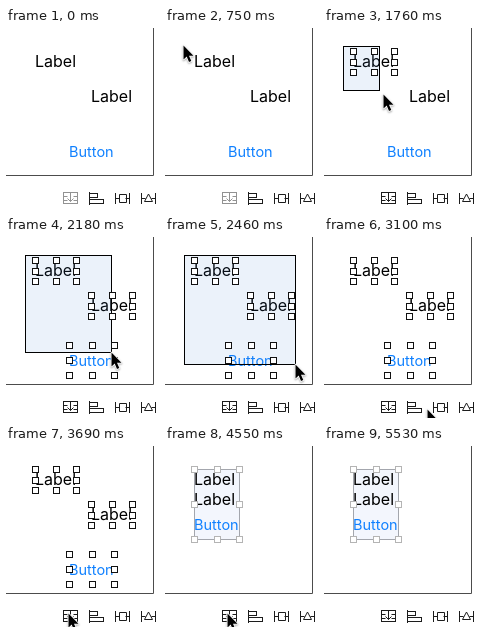
An HTML page with a canvas that plays this animation: 153x181 px, repeating every 6370 ms.

```html
<!DOCTYPE html>
<html lang="en">
<head>
<meta charset="utf-8">
<title>Stack view</title>
<style>
html, body { margin: 0; width: 100%; height: 100%; overflow: hidden; background: #fff; }
canvas { display: block; }
</style>
</head>
<body>
<canvas id="stage" width="153" height="181"></canvas>
<script>
const ctx = document.getElementById('stage').getContext('2d');
const LOOP = 6370, STEP = 40, LEAD = 50;
const ENTER = 300, DRAG = 1680, PAUSE = 1880, DROP = 2640, STACK = 4550, LEAVE = 5530;
const LEFT = 29, TOP = 23, ROW = 170.5, INK = '#1c1c1c';

const point = (x, y) => ({ x, y });
const entry = point(-13, 42), origin = point(18, 17);

// the pointer travels to each stop between two times and rests there
const stops = [
  { from: ENTER, until: 750, to: origin },
  { from: DRAG, until: PAUSE, to: point(97, 111) },
  { from: 2120, until: 2460, to: point(130, 127) },
  { from: 2810, until: 3100, to: point(103, 172) },
  { from: 3160, until: 3440, to: point(66, 170) },
  { from: 3490, until: 3690, to: point(62, 167) },
  { from: 5090, until: LEAVE, to: point(20, 185) }
];

const label = (x, y) => ({ text: 'Label', x, y, w: 41, h: 21, size: 16, color: '#000', base: 16 });
const button = (x, y) => ({ text: 'Button', x, y, w: 45, h: 30, size: 14.5, color: '#0f80ff', base: 21 });
const views = [label(LEFT, TOP), label(85, 58), button(63, 108)];

const mix = (a, b, p) => Math.round(a + (b - a) * p);

function pointerAt(t) {
  let pos = entry;
  for (const { from, until, to } of stops) {
    if (t < from) break;
    const held = Math.floor((t - from) / STEP) * STEP;
    const p = t >= until ? 1 : (held + LEAD) / (until - from + LEAD);
    pos = point(mix(pos.x, to.x, p), mix(pos.y, to.y, p));
  }
  return pos;
}

function path(...points) {
  ctx.beginPath();
  points.forEach(([x, y]) => ctx.lineTo(x, y));
}

function line(...points) {
  path(...points);
  ctx.stroke();
}

const across = (y, x1, x2) => line([x1, y], [x2, y]);
const down = (x, y1, y2) => line([x, y1], [x, y2]);

function box(x, y, w, h, fill, stroke) {
  ctx.fillStyle = fill;
  ctx.fillRect(x, y, w, h);
  ctx.strokeStyle = stroke;
  ctx.strokeRect(x + 0.5, y + 0.5, w - 1, h - 1);
}

function drawText(v, x = v.x, y = v.y) {
  ctx.font = v.size + 'px Inter, "Liberation Sans", sans-serif';
  ctx.fillStyle = v.color;
  ctx.fillText(v.text, x, y + v.base);
}

function handles(r, color) {
  for (let i = 0; i < 9; i++) {
    if (i === 4) continue;
    const x = mix(r.x, r.x + r.w, i % 3 / 2);
    const y = mix(r.y, r.y + r.h, Math.floor(i / 3) / 2);
    box(x - 3, y - 3, 7, 7, '#fff', color);
  }
}

function embedIcon(x, color) {
  const mid = x + 7;
  ctx.strokeStyle = color;
  ctx.strokeRect(x, ROW - 6, 14, 11);
  for (const side of [x, x + 10]) {
    across(ROW - 2, side, side + 4);
    across(ROW + 2, side, side + 4);
  }
  down(mid, ROW - 6, ROW + 3);
  line([mid - 3, ROW], [mid, ROW + 3], [mid + 3, ROW]);
}

function alignIcon(x) {
  ctx.strokeStyle = INK;
  down(x, ROW - 6.5, ROW + 6.5);
  ctx.strokeRect(x, ROW - 5, 8, 4);
  ctx.strokeRect(x, ROW + 1, 14, 4);
}

function spacingIcon(x, shape) {
  const mid = x + 7;
  ctx.strokeStyle = INK;
  for (const [bar, dir] of [[x, 1], [x + 14, -1]]) {
    down(bar, ROW - 5.5, ROW + 5.5);
    across(ROW, bar, bar + dir * 4);
  }
  path(...shape.map(([dx, dy]) => [mid + dx, ROW + dy]));
  ctx.closePath();
  ctx.stroke();
}

function drawIcons(enabled) {
  embedIcon(57.5, enabled ? INK : '#929292');
  alignIcon(83.5);
  spacingIcon(109.5, [[-3, -4], [4, -4], [4, 4], [-3, 4]]);
  spacingIcon(135.5, [[0, -4.5], [4, 3], [-4, 3]]);
}

function drawPointer({ x, y }) {
  ctx.save();
  ctx.translate(x, y);
  path([0.5, 0.5], [0.5, 14.5], [3.7, 11.6], [6, 17], [8.3, 16], [6, 10.8], [10.5, 10.8]);
  ctx.closePath();
  ctx.lineJoin = 'round';
  ctx.lineWidth = 1.6;
  ctx.strokeStyle = '#fff';
  ctx.shadowColor = 'rgba(0,0,0,.35)';
  ctx.shadowBlur = 2;
  ctx.shadowOffsetY = 1;
  ctx.stroke();
  ctx.shadowColor = 'transparent';
  ctx.fillStyle = '#000';
  ctx.fill();
  ctx.restore();
}

function drawLoose(t, pointer) {
  // the marquee trails the pointer while it is first pulled open
  const lag = t < PAUSE ? 4 : 0;
  const right = pointer.x - lag, bottom = pointer.y - lag;
  const dragging = t >= DRAG && t < DROP;
  views.forEach(v => drawText(v));
  if (dragging) {
    box(origin.x + 1, origin.y + 1, right - origin.x, bottom - origin.y, 'rgba(60,130,200,.1)', '#000');
  }
  if (t < DRAG) return;
  for (const v of views) {
    if (!dragging || (right > v.x && bottom > v.y)) handles(v, '#111');
  }
}

function drawStack() {
  const r = { x: LEFT, y: TOP, w: 45, h: 70 };
  box(r.x, r.y, r.w + 1, r.h + 1, '#f3f6fd', '#a3a6ad');
  let y = TOP;
  for (const v of views) {
    drawText(v, LEFT, y);
    y += v.h - 1;
  }
  handles(r, '#b4b4b4');
}

function draw(t) {
  const pointer = pointerAt(t);
  ctx.lineWidth = 1;
  ctx.fillStyle = '#fff';
  ctx.fillRect(0, 0, 153, 181);
  ctx.strokeStyle = '#4c4c4c';
  line([147.5, 0], [147.5, 147.5], [0, 147.5]);
  drawIcons(t > DRAG + STEP);
  if (t < STACK) drawLoose(t, pointer);
  else drawStack();
  if (t >= ENTER && t < LEAVE) drawPointer(pointer);
}

const start = performance.now();
function tick() {
  draw((performance.now() - start) % LOOP);
  requestAnimationFrame(tick);
}
tick();
</script>
</body>
</html>
```
